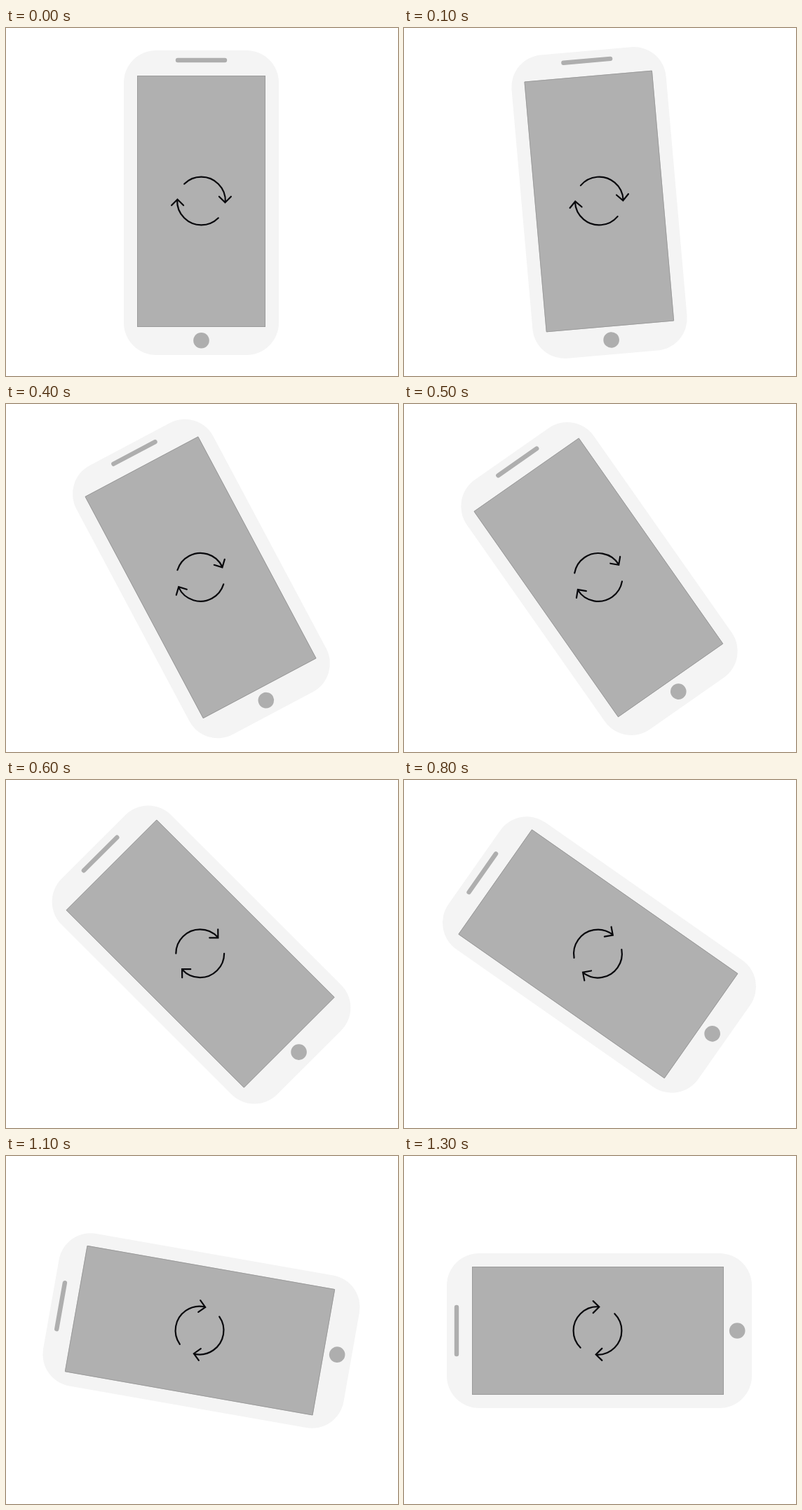
Animation, 559 px wide and 497 px high, one loop 1.4 s. Source, as an HTML page with a canvas:

```html
<!DOCTYPE html>
<html lang="en">
<head>
<meta charset="utf-8">
<title>Rotating phone</title>
<style>
  html, body { margin: 0; width: 100%; height: 100%; overflow: hidden; background: #fff; }
  canvas { display: block; width: 559px; height: 497px; }
</style>
</head>
<body>
<canvas id="stage" width="559" height="497"></canvas>
<script>
  const ctx = document.getElementById('stage').getContext('2d');
  const STEP = 100;
  // Counterclockwise tilt in degrees, held for one step each.
  const TILT = [0, 5, 10, 20, 28, 35, 45, 50, 55, 70, 70, 80, 85, 90];
  const PIVOT = { x: 278.5, y: 249.5 };

  function roundRect(x, y, w, h, r, fill) {
    ctx.beginPath();
    ctx.roundRect(x, y, w, h, r);
    ctx.fillStyle = fill;
    ctx.fill();
  }

  function arrow() {
    ctx.beginPath();
    ctx.arc(0, 0, 34.4, -Math.PI * 0.75, 0.05);
    ctx.moveTo(25.4, -6.3);
    ctx.lineTo(34, 2.3);
    ctx.lineTo(42.4, -6.3);
    ctx.stroke();
  }

  function syncIcon() {
    ctx.save();
    ctx.translate(0, -2.5);
    ctx.strokeStyle = '#08080c';
    ctx.lineWidth = 2.2;
    ctx.lineCap = 'round';
    ctx.lineJoin = 'miter';
    arrow();
    ctx.rotate(Math.PI);
    arrow();
    ctx.restore();
  }

  function phone() {
    roundRect(-110.5, -217.5, 221, 435, 46, '#f4f4f4');
    roundRect(-36.7, -206.7, 73.4, 6.4, 3.2, '#aeaeae');
    roundRect(-91.5, -181.5, 183, 359, 1, '#b0b0b0');
    ctx.strokeStyle = '#979797';
    ctx.lineWidth = 0.8;
    ctx.strokeRect(-91.1, -181.1, 182.2, 358.2);
    ctx.beginPath();
    ctx.arc(0, 196.7, 11.3, 0, Math.PI * 2);
    ctx.fillStyle = '#aeaeae';
    ctx.fill();
    syncIcon();
  }

  function draw(ms) {
    const tilt = TILT[Math.floor(ms / STEP) % TILT.length];
    ctx.fillStyle = '#fff';
    ctx.fillRect(0, 0, 559, 497);
    ctx.save();
    ctx.translate(PIVOT.x, PIVOT.y);
    ctx.rotate(-tilt * Math.PI / 180);
    phone();
    ctx.restore();
  }

  const start = performance.now();
  function tick() {
    draw(performance.now() - start);
    requestAnimationFrame(tick);
  }
  tick();
</script>
</body>
</html>
```
